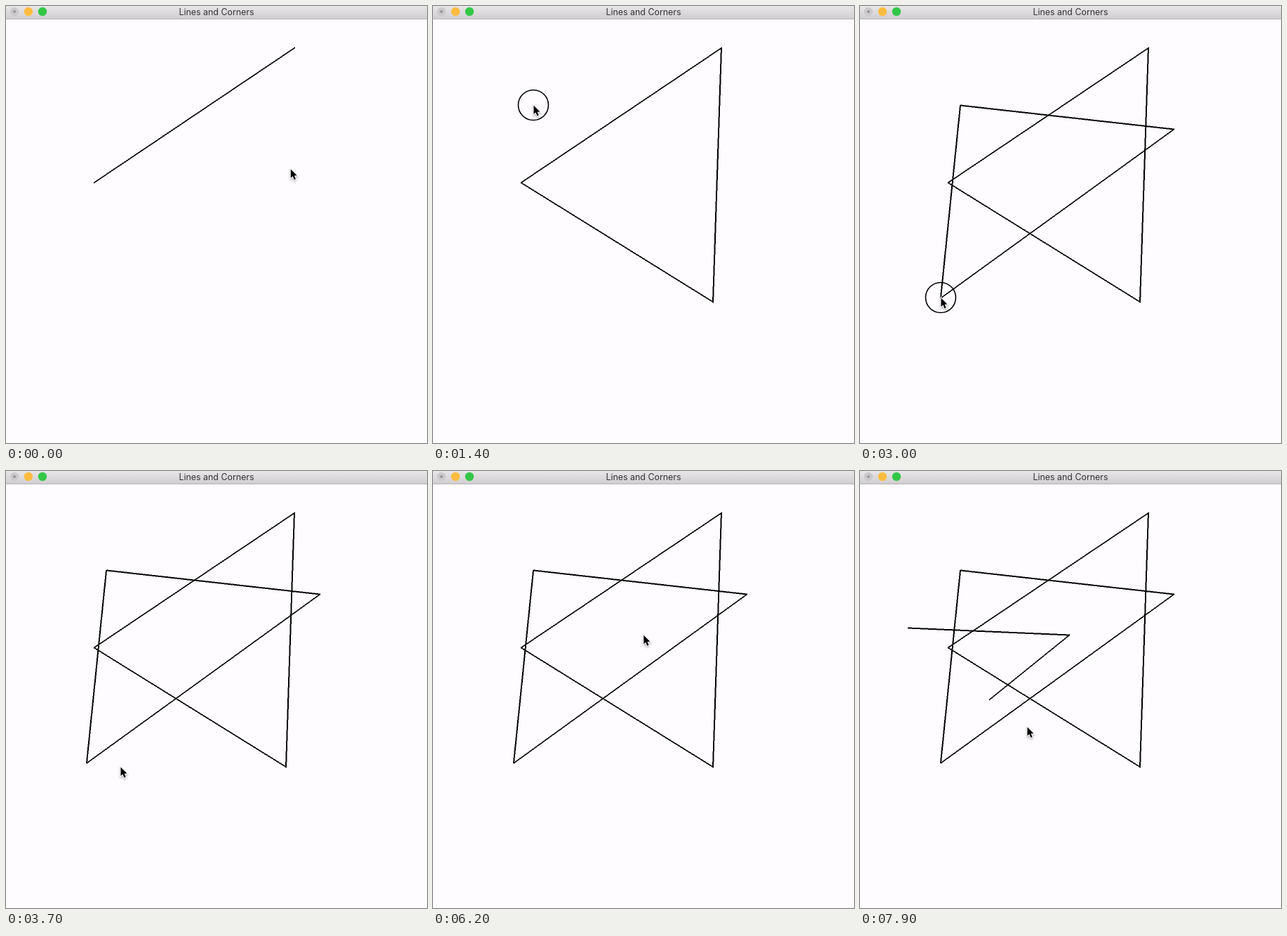
Recreate the animation shown at these times as an HTML page with a canvas. Size 600 by 622 pixels, loop 8000 ms.

```html
<!DOCTYPE html>
<html lang="en">
<head>
<meta charset="utf-8">
<title>Lines and Corners</title>
<style>
  html, body { margin: 0; width: 100%; height: 100%; overflow: hidden; background: #fefcff; }
  canvas { display: block; }
</style>
</head>
<body>
<canvas id="stage" width="600" height="622"></canvas>
<script>
const ctx = document.getElementById('stage').getContext('2d');
const LOOP = 8000, STEP = 100, PRESS = 200;

const click = (t, x, y) => ({ t, x, y, hold: PRESS });
const pass = (t, x, y) => ({ t, x, y, hold: 0 });

// The pointer glides from stop to stop and rests while pressing
const shapes = [
  [click(-900, 125, 251), click(-600, 411, 59), click(420, 399, 421)],
  [click(1250, 143, 141), click(2200, 447, 175), click(2900, 115, 415)],
  [click(4600, 68, 223), click(6300, 298, 233), click(7300, 184, 325)]
];
const detours = [pass(3700, 163, 421), pass(4000, 265, 400), pass(5500, 409, 244), pass(7900, 238, 364)];
const clicks = shapes.flat();
const stops = [...clicks, ...detours].sort((a, b) => a.t - b.t);

const ease = u => u * u * u * (10 + u * (6 * u - 15));
const mix = (a, b, k) => a + (b - a) * k;
const snap = v => Math.round(v * 2) / 2;

function pointerAt(t) {
  const i = stops.findLastIndex(s => s.t <= t);
  const a = stops[i], b = stops[i + 1] || a;
  const leave = a.t + a.hold;
  const k = t > leave && b !== a ? ease((t - leave) / (b.t - leave)) : 0;
  return [mix(a.x, b.x, k), mix(a.y, b.y, k)];
}

// Stepped line, two pixels thick across its longer axis
function line(a, b) {
  const dx = b.x - a.x, dy = b.y - a.y;
  const flat = Math.abs(dx) > Math.abs(dy);
  const n = Math.max(Math.abs(dx), Math.abs(dy));
  for (let i = 0; i <= n; i++) {
    const x = a.x + dx * i / n, y = a.y + dy * i / n;
    if (flat) ctx.fillRect(x, snap(y) - 0.5, 1, 2);
    else ctx.fillRect(snap(x) - 1, y, 2, 1);
  }
}

function disc(x, y, r, color) {
  ctx.beginPath();
  ctx.arc(x, y, r, 0, Math.PI * 2);
  ctx.fillStyle = color;
  ctx.fill();
}

function drawBar() {
  const shade = ctx.createLinearGradient(0, 0, 0, 18);
  shade.addColorStop(0, '#e8e6e8');
  shade.addColorStop(1, '#d0ced0');
  ctx.fillStyle = shade;
  ctx.fillRect(0, 0, 600, 18);
  ctx.fillStyle = '#b6b4b6';
  ctx.fillRect(0, 18, 600, 1);
  ['#cbc9cb', '#fdbc40', '#33c748'].forEach((color, i) => disc(12 + 20 * i, 8, 6.2, color));
  disc(12, 8, 2, '#989698');
  ctx.font = '12.4px Inter, Roboto, sans-serif';
  ctx.textAlign = 'center';
  ctx.fillStyle = '#343334';
  ctx.fillText('Lines and Corners', 300, 13);
}

function drawShapes(t) {
  ctx.fillStyle = '#000';
  shapes.forEach((shape, i) => {
    const points = shape.filter(p => p.t <= t);
    points.slice(1).forEach((p, j) => line(points[j], p));
    // The last shape is still being drawn when the loop ends
    const closed = points.length === 3 && i < 2;
    if (closed) line(points[2], points[0]);
  });
}

function drawPress(t) {
  const hit = clicks.find(c => t >= c.t && t < c.t + PRESS);
  if (!hit) return;
  ctx.beginPath();
  ctx.arc(hit.x, hit.y, 21.5, 0, Math.PI * 2);
  ctx.strokeStyle = '#000';
  ctx.lineWidth = 1.6;
  ctx.stroke();
}

const arrow = new Path2D('M0 0V12.6L2.9 10L5 15L7.2 14.1L5.1 9.3L9 9.1Z');

function drawPointer(t) {
  const [x, y] = pointerAt(t);
  ctx.save();
  ctx.translate(x + 0.5, y + 0.5);
  ctx.shadowColor = 'rgba(0,0,0,.35)';
  ctx.shadowBlur = 3;
  ctx.shadowOffsetY = 1.5;
  ctx.strokeStyle = '#fff';
  ctx.lineWidth = 2;
  ctx.stroke(arrow);
  ctx.shadowColor = 'transparent';
  ctx.fillStyle = '#000';
  ctx.fill(arrow);
  ctx.restore();
}

function draw(t) {
  ctx.fillStyle = '#fefcff';
  ctx.fillRect(0, 0, 600, 622);
  drawBar();
  drawShapes(t);
  drawPress(t);
  drawPointer(t);
}

const start = performance.now();
function tick() {
  const t = (performance.now() - start) % LOOP;
  draw(Math.floor(t / STEP) * STEP);
  requestAnimationFrame(tick);
}
tick();
</script>
</body>
</html>
```
